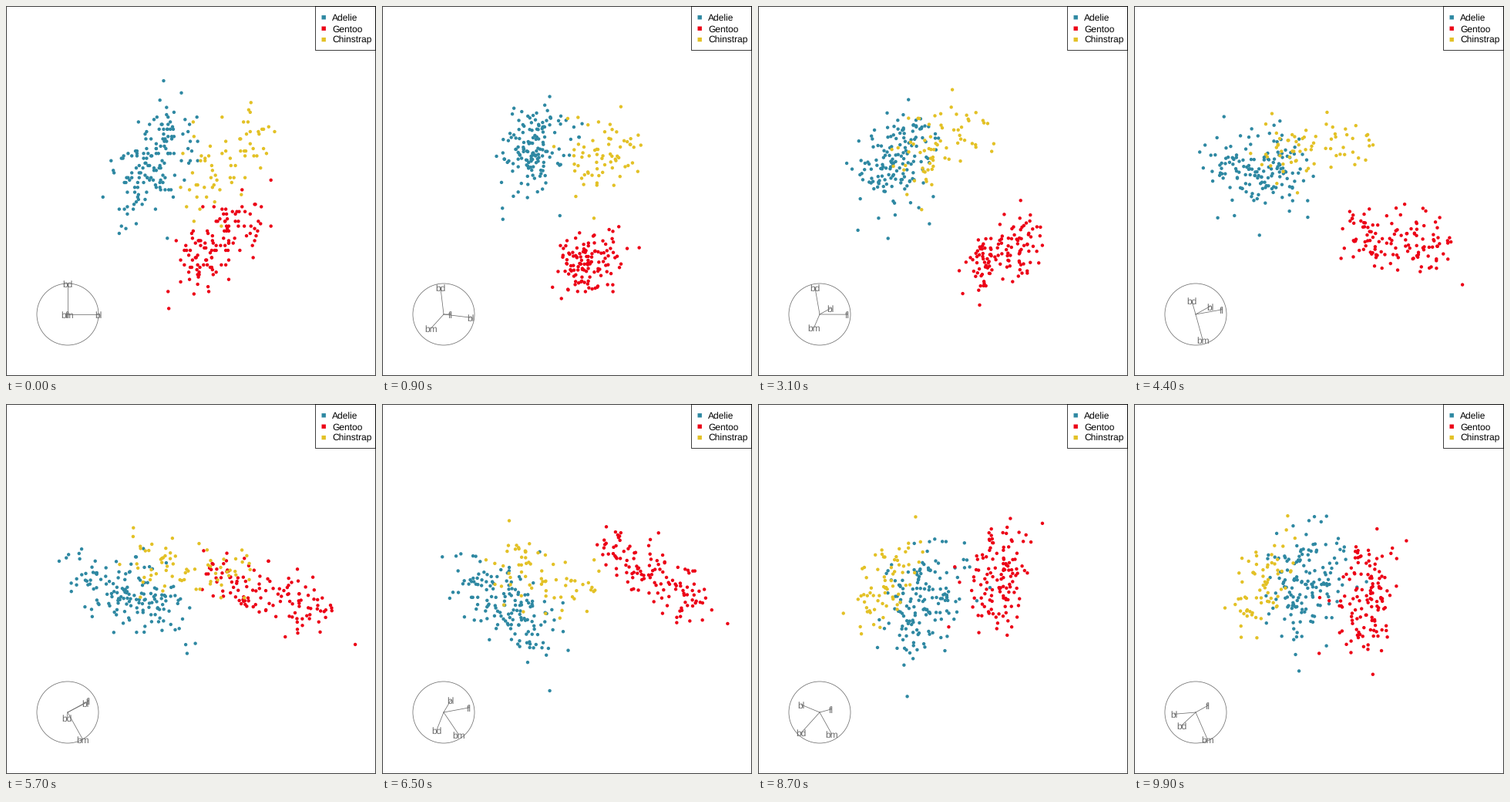
These frames come from a looping animation (480x480 px, 10000 ms). A matplotlib script:

```python
import numpy as np
import matplotlib.pyplot as plt
from matplotlib.animation import FuncAnimation
from matplotlib.patches import Circle, Rectangle

plt.rcParams["text.hinting"] = "none"

SIZE, DPI, FRAMES = 480, 100, 100
PX = 72 / DPI
LINE = 0.75 * PX
MID, SCALE = 240, 264
HUB, RADIUS = np.array([80, 400]), 40
FLIP = np.array([1, -1])
GREY = "#6b6b6b"
FONT = dict(family="Liberation Sans", fontsize=12 * PX, va="baseline")
VARS = ["bl", "bd", "fl", "bm"]

CENTER = np.array([43.9, 17.15, 200.9, 4202])
RANGE = np.array([27.5, 8.4, 59, 3600])
STEP = np.array([0.1, 0.1, 1, 25])

# name, colour, count, share of the common size factor, means, deviations
SPECIES = [
    ("Adelie", "#2e88a2", 151, 0.67,
     (38.8, 18.35, 190, 3701), (2.66, 1.22, 6.5, 459)),
    ("Gentoo", "#ec0016", 123, 0.83,
     (47.5, 14.98, 217.2, 5076), (3.08, 0.98, 6.5, 504)),
    ("Chinstrap", "#e3c126", 68, 0.76,
     (48.8, 18.42, 195.8, 3733), (3.34, 1.13, 7.1, 384)),
]

# Tour waypoints: step, then the spoke tip of each variable as x + yj
STOPS = [
    (0, 1, 1j, 0, 0),
    (9, .88 - .10j, -.10 + .88j, .22, -.41 - .45j),
    (21, .55 - .15j, -.10 + .86j, .55 - .20j, -.62 - .40j),
    (31, .35 + .19j, -.15 + .87j, .90, -.18 - .41j),
    (57, .57 + .31j, -.03 - .18j, .66 + .38j, .45 - .85j),
    (73, -.15 + .41j, -.38 - .82j, .83 - .10j, .40 - .40j),
    (87, -.60 + .25j, -.59 - .65j, .38 + .10j, .40 - .71j),
    (99, -.69 - .05j, -.46 - .43j, .40 + .22j, .39 - .88j),
]


def orthonormal(m):
    u, _, v = np.linalg.svd(m, full_matrices=False)
    return u @ v


TIMES = [stop[0] for stop in STOPS]
BASES = [orthonormal(np.array([np.real(stop[1:]), np.imag(stop[1:])]))
         for stop in STOPS]


def basis(step):
    k = min(np.searchsorted(TIMES, step, side="right") - 1, len(TIMES) - 2)
    t = (step - TIMES[k]) / (TIMES[k + 1] - TIMES[k])
    return orthonormal((1 - t) * BASES[k] + t * BASES[k + 1])


def sample(rng, n, share, mean, dev):
    """Two sexes of different size, plus independent variation per variable."""
    sex = np.where(np.arange(n) % 2, 1, -1)
    size = 0.9 * sex + 0.43 * rng.standard_normal(n)
    noise = rng.standard_normal((n, 4))
    z = share * size[:, None] + np.sqrt(1 - share ** 2) * noise
    z = (z - z.mean(0)) / z.std(0)
    rows = np.round((mean + z * dev) / STEP) * STEP
    return (rows - CENTER) / RANGE


rng = np.random.default_rng(12)
data = np.vstack([sample(rng, *spec) for _, _, *spec in SPECIES])
colors = np.repeat([s[1] for s in SPECIES], [s[2] for s in SPECIES])

fig = plt.figure(figsize=(SIZE / DPI, SIZE / DPI), dpi=DPI, facecolor="white")
ax = fig.add_axes([0, 0, 1, 1])
ax.set_xlim(0, SIZE)
ax.set_ylim(SIZE, 0)
ax.axis("off")


def box(x, y, w, h, **style):
    ax.add_patch(Rectangle((x, y), w, h, snap=False, **style))


ax.add_patch(Circle(HUB, RADIUS, fill=False, ec=GREY, lw=LINE))
spokes = [ax.plot([], [], color=GREY, lw=LINE)[0] for _ in VARS]
tags = [ax.text(0, 0, v, color=GREY, ha="center", **FONT) for v in VARS]
dots = ax.scatter(*np.zeros((2, len(data))), s=(4.4 * PX) ** 2,
                  c=colors, linewidths=0, zorder=3)

box(401.5, 0.5, 78, 57, fc="white", ec="black", lw=LINE, zorder=5)
box(0.5, 0.5, SIZE - 1, SIZE - 1, fill=False, ec="black", lw=LINE, zorder=6)
for i, (name, color, *_) in enumerate(SPECIES):
    y = 14.8 + 14.4 * i
    box(409.5, y - 2.7, 5.4, 5.4, fc=color, lw=0, zorder=6)
    ax.text(423, y + 4.4, name, color="black", zorder=6, **FONT)


def draw(step):
    b = basis(step)
    dots.set_offsets(MID + SCALE * (data @ b.T) * FLIP)
    for spoke, tag, (x, y) in zip(spokes, tags, HUB + RADIUS * b.T * FLIP):
        spoke.set_data([HUB[0], x], [HUB[1], y])
        tag.set_position((x, y + 5))
    return [dots, *spokes, *tags]


anim = FuncAnimation(fig, draw, frames=FRAMES, interval=1000 * 10 / FRAMES,
                     repeat=True, repeat_delay=0, blit=False)
plt.show()
```
